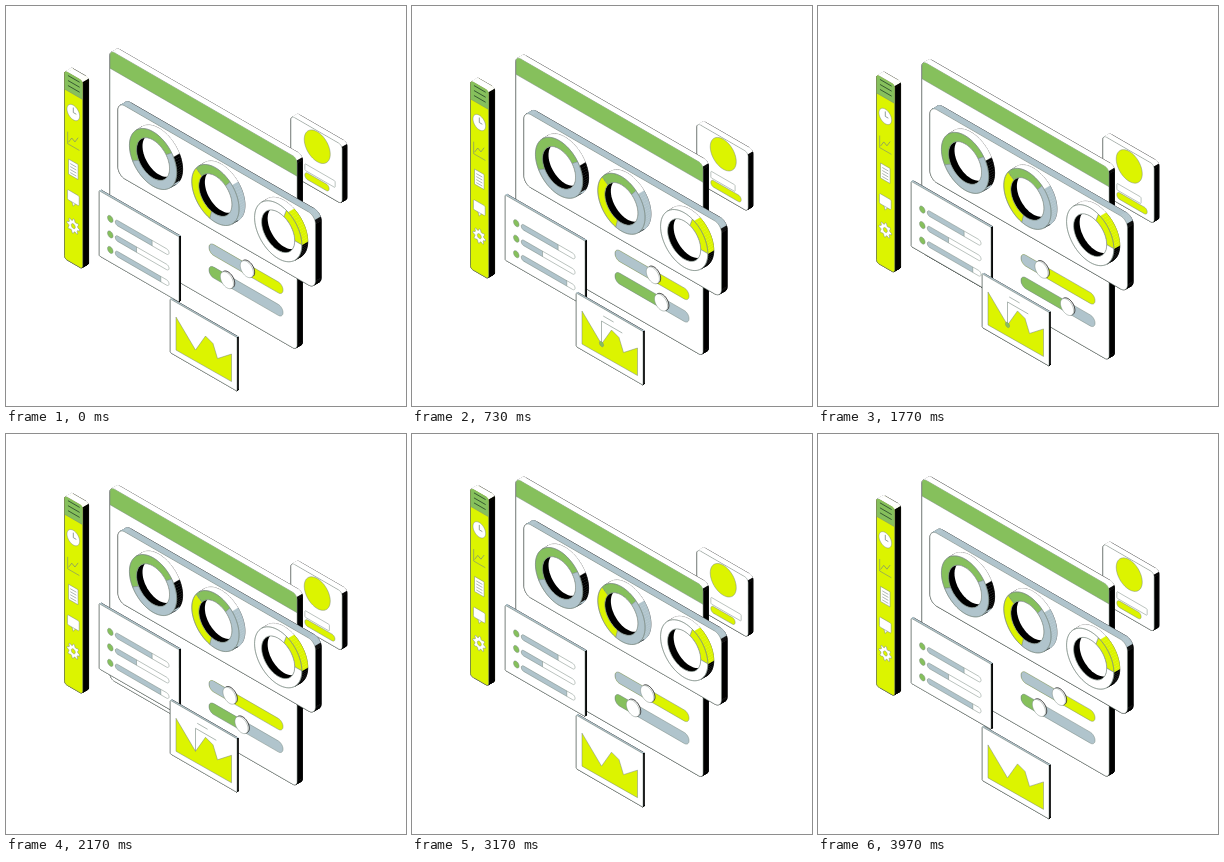
An HTML page with a canvas that plays this animation: 400 px wide and 400 px high, repeating every 4010 ms.

```html
<!DOCTYPE html>
<html lang="en">
<head>
<meta charset="utf-8">
<title>Isometric dashboard</title>
<style>
html, body { margin: 0; width: 100%; height: 100%; overflow: hidden; background: #fff; }
canvas { display: block; width: 400px; height: 400px; }
</style>
</head>
<body>
<canvas id="stage"></canvas>
<script>
const LOOP = 4010;
const GREEN = '#86c05c', LIME = '#dcf400', GREY = '#b0c4cc';
const BLACK = '#000', WHITE = '#fff', LINE = '#76877e';
const canvas = document.getElementById('stage');
const ctx = canvas.getContext('2d');
const ratio = window.devicePixelRatio || 1;
canvas.width = canvas.height = 400 * ratio;

// Left-facing isometric plane: local x runs right and down, local y straight down.
const plane = (ox, oy) => (x, y) => [ox + x * 0.866, oy + x * 0.5 + y];
const moved = (pts, d) => pts.map(p => [p[0] + d[0], p[1] + d[1]]);
const back = depth => [depth * 0.866, -depth * 0.5];

const wave = (t, mid, amp, peak) => mid + amp * Math.cos((t - peak) / LOOP * 2 * Math.PI);

function ease(t, from, to) {
  const p = Math.min(1, Math.max(0, (t - from) / (to - from)));
  return p * p * (3 - 2 * p);
}
const pulse = (t, on, full, off, gone) => ease(t, on, full) - ease(t, off, gone);

function arc(at, cx, cy, r, from = 0, to = 360) {
  const n = Math.max(6, Math.ceil(Math.abs(to - from) / 5)), pts = [];
  for (let i = 0; i <= n; i++) {
    const a = (from + (to - from) * i / n) * Math.PI / 180;
    pts.push(at(cx + r * Math.cos(a), cy + r * Math.sin(a)));
  }
  return pts;
}

const box = (at, x, y, w, h, r = 0) => [
  ...arc(at, x + r, y + r, r, 180, 270),
  ...arc(at, x + w - r, y + r, r, 270, 360),
  ...arc(at, x + w - r, y + h - r, r, 0, 90),
  ...arc(at, x + r, y + h - r, r, 90, 180)
];

function trace(pts, close = true) {
  ctx.beginPath();
  pts.forEach(p => ctx.lineTo(p[0], p[1]));
  if (close) ctx.closePath();
}

function shape(pts, fill, stroke = LINE, width = 0.5) {
  trace(pts);
  if (fill) { ctx.fillStyle = fill; ctx.fill(); }
  if (stroke) { ctx.strokeStyle = stroke; ctx.lineWidth = width; ctx.stroke(); }
}

function line(pts, width = 0.6, color = LINE) {
  trace(pts, false);
  ctx.strokeStyle = color;
  ctx.lineWidth = width;
  ctx.stroke();
}

function clipped(pts, draw) {
  ctx.save();
  trace(pts);
  ctx.clip();
  draw();
  ctx.restore();
}

// Visible side walls of an outline pushed back by d.
function walls(pts, d, colorOf) {
  const n = pts.length;
  let last = null;
  pts.forEach((a, i) => {
    const b = pts[(i + 1) % n];
    const nx = b[1] - a[1], ny = a[0] - b[0], len = Math.hypot(nx, ny);
    if (len < 1e-6) return;
    const seen = nx * d[0] + ny * d[1] > 0;
    if (seen) {
      const color = colorOf(ny / len, i / n * 360);
      shape([a, b, ...moved([b, a], d)], color, color, 0.4);
    }
    if (last !== null && seen !== last) line([a, ...moved([a], d)], 0.6, BLACK);
    last = seen;
  });
}

function slab(pts, depth, top, face = WHITE) {
  const d = back(depth);
  shape(moved(pts, d), face, BLACK, 0.9);
  shape(pts, face, BLACK, 0.8);
  walls(pts, d, ny => ny < -0.3 ? top : BLACK);
  shape(pts, face, LINE, 0.5);
}

function header(body, at, w, h) {
  clipped(body, () => shape(box(at, 0, -9, w, h + 9), GREEN));
}

function meter(at, x, y, w, h, split, left, right) {
  const pts = box(at, x, y - h / 2, w, h, h / 2);
  clipped(pts, () => {
    shape(box(at, x, y - h, w, h * 2), right, null);
    shape(box(at, x, y - h, split - x, h * 2), left);
  });
  shape(pts, null);
}

function sidebar(t) {
  const y0 = wave(t, 64.5, 11, 1002);
  const body = plane(58.5, y0);
  const panel = box(body, 0, 0, 21, 188, 3);
  slab(panel, 6.8, WHITE, LIME);
  header(panel, body, 21, 18.5);
  for (let y = 3; y < 15; y += 5) line([body(4, y), body(17.5, y)], 0.8, '#244026');

  // Icons are evenly spaced, each drawn around its own centre.
  const icon = i => plane(67.3, y0 + 42 + 28.4 * i);
  const clock = icon(0), chart = icon(1), page = icon(2), chat = icon(3), gear = icon(4);

  shape(arc(clock, 0, 0, 7.3), WHITE);
  line([clock(0, -5), clock(0, 0), clock(3.5, 0)], 0.8);

  line([chart(-6.5, -6), chart(-6.5, 6), chart(7, 6)]);
  const zigzag = [0, 1, 2, 3].map(i => chart(-5.5 + 3.7 * i, 4 - 2 * i - (i % 2) * 4));
  line(zigzag, 0.7);

  shape(box(page, -5.5, -7.5, 11, 15), WHITE);
  for (let y = -4; y < 6; y += 3) line([page(-3.5, y), page(3.5, y)]);

  shape([chat(-2, 4), chat(0, 8.5), chat(3, 4)], WHITE);
  shape(box(chat, -6.8, -5, 13.6, 10, 1.5), WHITE);

  const cogs = Array.from({ length: 32 }, (_, i) => {
    const a = i / 16 * Math.PI, r = i % 4 < 2 ? 7.3 : 5.3;
    return gear(r * Math.cos(a), r * Math.sin(a));
  });
  shape(cogs, WHITE);
  shape(arc(gear, 0, 0, 2.3), LIME);
}

function slider(at, y, knob, left, right) {
  meter(at, 114.3, y, 85.5, 11, knob, left, right);
  const disc = arc(at, knob, y, 7.6);
  shape(moved(disc, back(1.4)), WHITE, BLACK, 0.8);
  shape(disc, WHITE);
}

function browser(t) {
  const at = plane(104, wave(t, 49, 6, 1595));
  const body = box(at, 0, 0, 216, 192, 5);
  slab(body, 6.2, WHITE);
  header(body, at, 216, 18);
  slider(at, 140, 158 - 20 * pulse(t, 760, 1330, 2770, 3420), GREY, LIME);
  slider(at, 162.5, 135 + 32.5 * pulse(t, 80, 700, 1800, 2560), GREEN, GREY);
}

// Each part is [start angle, colour] and runs on to the next part's start.
function donut(at, x, parts, wallColor) {
  const R = 27.3, r = 19, y = 36.8, d = back(6.8);
  const outer = arc(at, x, y, R), inner = arc(at, x, y, r);
  shape(moved(outer, d), WHITE, BLACK, 0.6);
  walls(outer, d, (ny, deg) => wallColor((deg + 180) % 360 - 180));
  parts.forEach(([from, color], i) => {
    const to = i + 1 < parts.length ? parts[i + 1][0] : parts[0][0] + 360;
    shape([...arc(at, x, y, R, from, to), ...arc(at, x, y, r, to, from)], color);
  });
  clipped(inner, () => {
    shape(inner, BLACK, null);
    shape(moved(inner, d), WHITE, null);
  });
  shape(inner, null);
  shape(outer, null);
}

function charts(t) {
  const at = plane(112, wave(t, 96.2, 9.5, 1020));
  slab(box(at, 0, 0, 228, 73, 8), 6.6, GREY);
  donut(at, 40.5, [[-210, GREEN], [-38, GREY]], a => a < -38 ? WHITE : a < 28 ? BLACK : GREY);
  donut(at, 112.5, [[-145, GREEN], [-52, GREY], [104, LIME]], a => a < -52 ? WHITE : GREY);
  donut(at, 185, [[-70, LIME], [0, WHITE]], a => a < -70 ? WHITE : a < 0 ? LIME : BLACK);
}

function profile(t) {
  const at = plane(285, wave(t, 119.4, 10, 1885));
  slab(box(at, 0, 0, 59, 59, 4), 5.6, WHITE);
  shape(arc(at, 30.3, 16, 15), LIME);
  const swap = 7 * pulse(t, 80, 700, 2100, 2650);
  shape(box(at, 16, 40, 35 - swap, 6.6, 1), WHITE);
  shape(box(at, 16, 48, 28 + swap, 6.6, 3.2), LIME);
}

function list(t) {
  const at = plane(93.3, wave(t, 178.3, 11, 600));
  slab(box(at, 0, 0, 92, 65, 0.8), 1.8, GREY);
  [61, 43, 71].forEach((split, i) => {
    const y = 21.8 + i * 15.5;
    shape(arc(at, 12.7, y, 3.2), GREEN);
    meter(at, 18.5, y, 62, 5.4, split, GREY, WHITE);
  });
}

function graph(t) {
  const y0 = wave(t, 279.7, 13.5, 95);
  slab(box(plane(164.3, y0), 0, 0, 77, 53.5, 0.8), 1.5, GREY);
  const at = (x, y) => [x, y0 + y];
  const ridge = [[170, 18], [189.5, 51], [199.5, 37], [207, 44.5], [211.5, 59.5], [225.5, 55]];
  shape([...ridge, [225.5, 82.5], [170, 51]].map(p => at(...p)), LIME);

  const tip = pulse(t, 200, 680, 2180, 2650);
  if (tip > 0.01) {
    const flag = plane(189.5, y0 + 51 - 23 * tip);
    line([at(189.5, 51), flag(0, 0), flag(24 * tip, 0)]);
    line([flag(2, -6), flag(2 + 12 * tip, -6)]);
  }
  const dot = pulse(t, 200, 680, 1750, 2170);
  if (dot > 0.01) shape(arc(plane(189.5, y0 + 51), 0, 0, 2.4 * dot), GREEN);
}

function draw(now) {
  const t = now % LOOP;
  ctx.setTransform(ratio, 0, 0, ratio, 0, 0);
  ctx.lineJoin = 'round';
  ctx.fillStyle = WHITE;
  ctx.fillRect(0, 0, 400, 400);
  for (const part of [profile, browser, charts, list, graph, sidebar]) part(t);
}

const start = performance.now();
function tick() {
  draw(performance.now() - start);
  requestAnimationFrame(tick);
}
tick();
</script>
</body>
</html>
```
